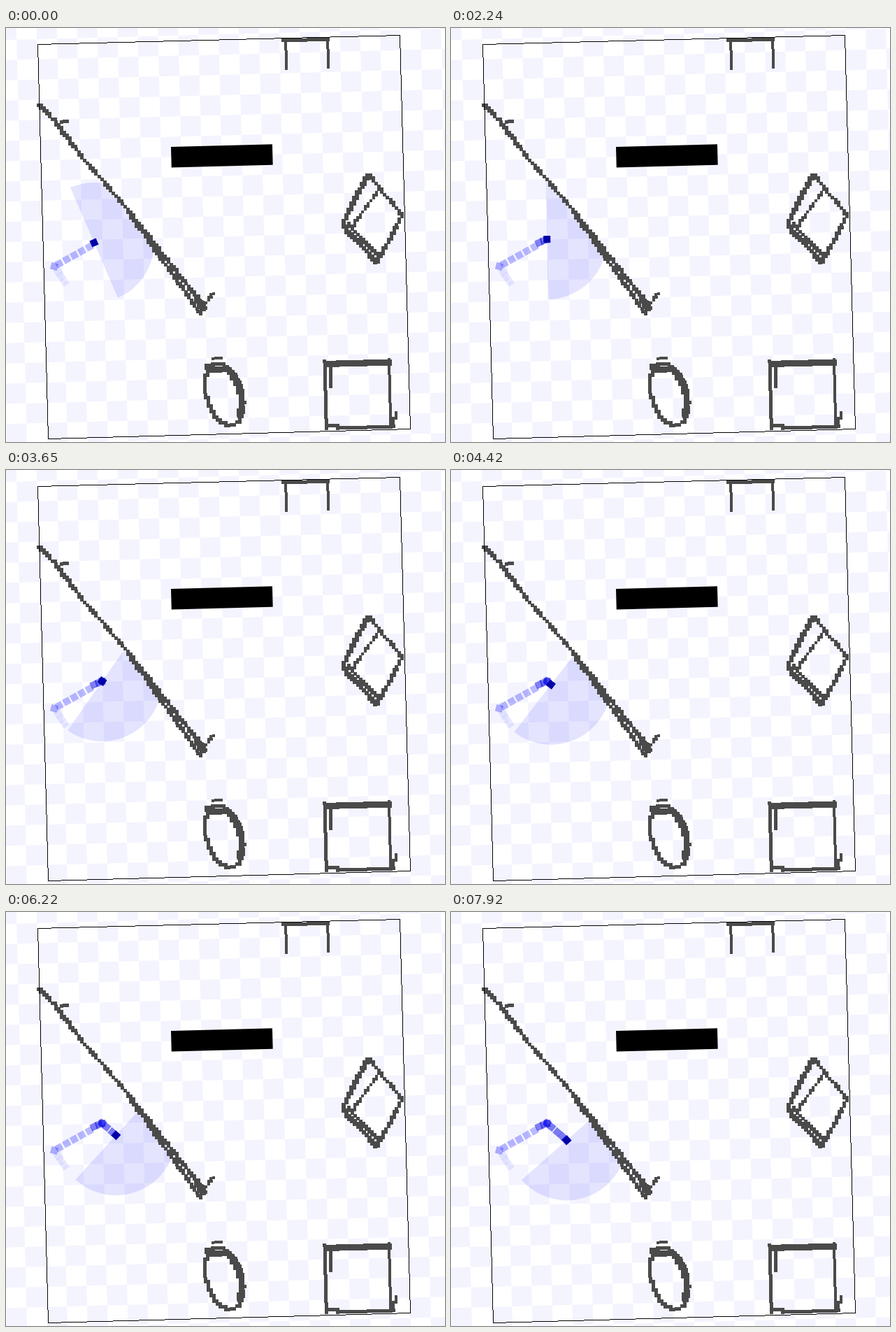
An HTML page with a canvas for the animation above (7990 ms loop, 628 by 592 pixels).

```html
<!DOCTYPE html>
<html>
<head>
<meta charset="utf-8">
<style>
html, body { margin: 0; width: 100%; height: 100%; overflow: hidden; background: #fff; }
canvas { display: block; }
</style>
</head>
<body>
<canvas id="stage" width="628" height="592"></canvas>
<script>
const ctx = document.getElementById('stage').getContext('2d');
const LOOP = 7990, BURST = 1090, RANGE = 86;
const TILT = -0.0256, OX = 236, OY = 170, CELL = 28.9, PX = 4;
const C = Math.cos(TILT), S = Math.sin(TILT), RAD = Math.PI / 180;

const wall = [[48, 110], [62, 124], [120, 198], [160, 243], [285, 400]];
const headings = [[0, -23.3], [1010, -18.3], [2240, 1.3], [3260, 30], [3800, 37.5], [5130, 38.5], [LOOP, 49]];

function headingAt(t) {
  const i = Math.max(1, headings.findIndex(([time]) => time >= t));
  const [t0, a] = headings[i - 1], [t1, b] = headings[i];
  return a + (b - a) * (t - t0) / (t1 - t0);
}

function easeOut(t, from, to) {
  const k = Math.min(1, Math.max(0, (t - from) / (to - from)));
  return 1 - (1 - k) ** 1.35;
}

// Roll up to the corner, turn, then drive off along the wall.
function poseAt(t) {
  const arrive = easeOut(t, 0, 2240), leave = easeOut(t, 3650, 7900);
  return [126 + 11.5 * arrive + 28 * leave, 307 - 5 * arrive + 24.4 * leave, headingAt(t)];
}

// The robot advances in bursts of eleven steps.
function stepped(t) {
  if (t < 70) return 0;
  const start = 70 + BURST * Math.floor((t - 70) / BURST);
  return start + 94 * Math.min(10, Math.floor((t - start) / 94));
}

function tilted(draw) {
  ctx.save();
  ctx.translate(OX, OY);
  ctx.rotate(TILT);
  draw();
  ctx.restore();
}

// Square dots along a polyline, snapped to the tilted map grid.
function dots(points, w = 5) {
  const snap = d => Math.round(d / PX) * PX;
  for (let i = 1; i < points.length; i++) {
    const [x0, y0] = points[i - 1], [x1, y1] = points[i];
    const n = Math.ceil(Math.hypot(x1 - x0, y1 - y0) / 2);
    for (let j = 0; j <= n; j++) {
      const dx = x0 + (x1 - x0) * j / n - OX, dy = y0 + (y1 - y0) * j / n - OY;
      const u = snap(dx * C + dy * S), v = snap(dy * C - dx * S);
      ctx.fillRect(Math.round(OX + u * C - v * S - w / 2), Math.round(OY + u * S + v * C - w / 2), w, w);
    }
  }
}

function crispLine([x0, y0], [x1, y1]) {
  const n = Math.max(Math.abs(x1 - x0), Math.abs(y1 - y0));
  for (let i = 0; i <= n; i++)
    ctx.fillRect(Math.round(x0 + (x1 - x0) * i / n), Math.round(y0 + (y1 - y0) * i / n), 1, 1);
}

function oval(from, to, rx, ry) {
  return Array.from({ length: 25 }, (_, i) => {
    const a = from + (to - from) * i / 24, y = ry * Math.sin(a);
    return [312 + rx * Math.cos(a) + 0.2 * y, 524 + y];
  });
}

function obstacles() {
  ctx.fillStyle = '#4a4a4a';
  // leaning wall
  dots(wall);
  dots([[180, 270], [278, 408]]);
  dots([[272, 386], [281, 400]], 9);
  dots([[284, 394], [297, 379]], 4);
  dots([[68, 129], [82, 149]], 4);
  dots([[78, 134], [88, 134]], 5);
  // bracket
  dots([[397, 16], [459, 15]]);
  dots([[400, 16], [401, 57]], 4);
  dots([[459, 16], [460, 56]], 4);
  // diamond
  const top = [518, 209], right = [567, 268], bottom = [531, 335], left = [481, 281];
  dots([top, right, bottom]);
  dots([bottom, left, top], 6);
  dots([[490, 281], [533, 327]]);
  dots([[532, 232], [497, 282]], 4);
  // oval
  dots(oval(0, 2 * Math.PI, 26, 44));
  dots(oval(-1.2, 0.8, 24, 40), 8);
  dots([[290, 486], [304, 490]], 9);
  dots([[296, 474], [307, 472]], 4);
  // square
  dots([[459, 479], [548, 477]], 9);
  dots([[457, 478], [458, 572]]);
  dots([[464, 482], [464, 513]]);
  dots([[549, 476], [550, 569]], 4);
  dots([[556, 550], [556, 570]], 4);
  dots([[458, 570], [555, 570]]);
}

function block(x, y, deg, color) {
  ctx.save();
  ctx.translate(x, y);
  ctx.rotate(deg * RAD);
  ctx.fillStyle = color;
  ctx.fillRect(-5, -5, 10, 10);
  ctx.restore();
}

function trail(t) {
  for (let i = 0; i < 3; i++) block(84 - i * 5, 363 - i * 7.5, 56, 'rgba(0,0,255,.08)');
  block(69, 341, 15, 'rgba(0,0,255,.3)');
  for (let i = 0; i < 5; i++) block(76 + i * 10.8, 337 - i * 6, -29, 'rgba(0,0,255,.27)');
  for (let s = 0; s < t; s += BURST) block(...poseAt(s), 'rgba(0,0,230,.5)');
}

function view(x, y, deg) {
  const a = deg * RAD;
  ctx.save();
  ctx.beginPath();
  [...wall, [285, 592], [48, 592]].forEach(p => ctx.lineTo(...p));
  ctx.clip();
  ctx.beginPath();
  ctx.arc(x, y, RANGE, a - Math.PI / 2, a + Math.PI / 2);
  ctx.fillStyle = 'rgba(0,0,255,.105)';
  ctx.fill();
  ctx.restore();
}

function checker() {
  ctx.fillStyle = '#f4f4ff';
  for (let i = -10; i < 16; i++)
    for (let j = -8; j < 17; j++)
      if ((i + j) % 2 === 0) ctx.fillRect((i - 0.5) * CELL, (j - 0.5) * CELL, CELL, CELL);
}

function draw(t) {
  const now = stepped(t), pose = poseAt(now);
  ctx.fillStyle = '#fff';
  ctx.fillRect(0, 0, 628, 592);
  tilted(checker);
  trail(now);
  view(...pose);
  block(...pose, '#0000a8');
  obstacles();
  ctx.fillStyle = '#000';
  tilted(() => ctx.fillRect(0, 0, 145, 29.5));
  const corners = [[45, 23], [563, 10], [578, 573], [60, 587]];
  corners.forEach((p, i) => crispLine(p, corners[(i + 1) % 4]));
}

function tick() {
  draw(performance.now() % LOOP);
  requestAnimationFrame(tick);
}
tick();
</script>
</body>
</html>
```
